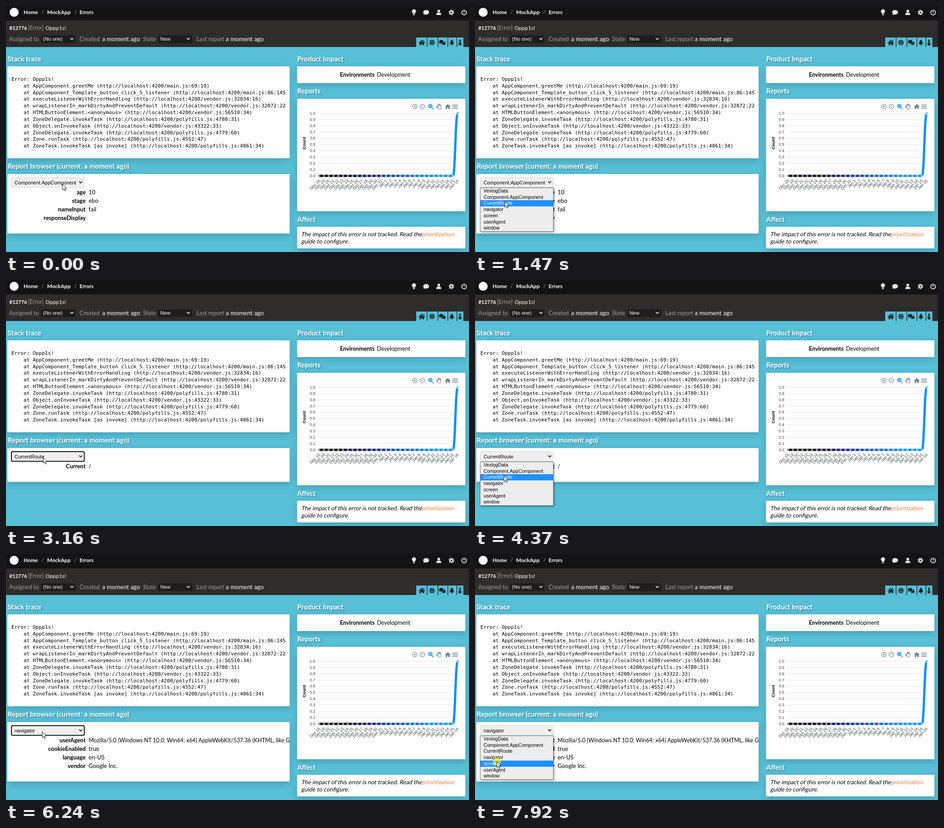
Recreate the animation shown at these times as an HTML page. Size 1026 by 546 pixels, loop 8 s.

```html
<!DOCTYPE html>
<html lang="en">
<head>
<meta charset="utf-8">
<title>Error report</title>
<style>
html, body { margin: 0; width: 100%; height: 100%; overflow: hidden; background: #57bfd6; }
svg { display: block; width: 1026px; height: 546px; }
text { font: 13px Lato, sans-serif; white-space: pre; }
.b { font-weight: 700; }
.ui { font-family: "Liberation Sans", Arial, sans-serif; }
.code { font-family: "DejaVu Sans Mono", monospace; }
.title { font-weight: 700; fill: #fff; filter: drop-shadow(2px 2px 1px rgba(0, 0, 0, .3)); }
.panel { fill: #fff; filter: drop-shadow(0 5px 7px rgba(0, 0, 0, .17)); }
.line { fill: none; stroke-linecap: round; stroke-linejoin: round; }
</style>
</head>
<body>
<svg id="stage" viewBox="0 0 1026 546">
  <defs>
    <linearGradient id="blue" gradientUnits="userSpaceOnUse" x1="694" x2="1001" y1="0" y2="0">
      <stop offset="0" stop-color="#000"/><stop offset=".22" stop-color="#000018"/>
      <stop offset=".4" stop-color="#0a1a70"/><stop offset=".6" stop-color="#0a55a8"/>
      <stop offset=".85" stop-color="#008ffb"/>
    </linearGradient>
  </defs>
  <rect width="1026" height="546" fill="#57bfd6"/>
  <rect width="1026" height="91" fill="#2f2c2c"/>
  <rect width="1026" height="32" fill="#131313"/>
  <circle cx="18" cy="14" r="10" fill="#fff"/>

  <g fill="#e8e8e8">
    <path d="M902 17.2c0-2-2.7-2.800-2.700-5.200a4.700 4.700 0 0 1 9.400 0c0 2.400-2.700 3.200-2.700 5.200zM902 18h4v1.500l-1 1h-2l-1-1z"/>
    <path d="M931 9c3.600 0 6.500 2.200 6.500 5s-2.900 5-6.500 5c-1 0-2-.2-2.800-.5-1 .8-2.200 1.200-3.500 1.200.8-.8 1.200-1.600 1.300-2.600-1-.8-1.500-1.900-1.500-3.100 0-2.800 2.900-5 6.500-5z"/>
    <circle cx="959" cy="11.300" r="3"/>
    <path d="M953.700 20v-1.500c0-2.300 1.500-3.800 3.500-3.800h3.600c2 0 3.500 1.500 3.500 3.800v1.500z"/>
    <g class="line" stroke="#e8e8e8">
      <circle cx="987" cy="14.300" r="3.200" stroke-width="2.600"/>
      <circle cx="987" cy="14.300" r="5.200" stroke-width="2" stroke-dasharray="2.300 3.145" stroke-linecap="butt"/>
      <path d="M1012.500 10a5.200 5.200 0 1 0 5.400 0M1015.200 8.500v5.500" stroke-width="1.800"/>
    </g>
  </g>

  <path fill="#57bfd6" d="M909 70h23.500v21h-23.500zM934 70h22.500v21h-22.500zM958 70h20.500v21h-20.500zM980 70h18.500v21h-18.500zM1000 70h13.500v21h-13.500z"/>
  <g fill="#10161a">
    <path d="M914 81.500l7.500-6.500 7.500 6.500-.9 1-6.600-5.700-6.600 5.700zM916.500 82.200l5-4.200 5 4.200v4.800h-3.700v-3.500h-2.600v3.500h-3.700zM925 75.500h1.700v3l-1.700-1.500z"/>
    <circle cx="944" cy="81" r="6"/>
    <path class="line" stroke="#57bfd6" stroke-width=".9" d="M938 79h12M938 83h12M944 75c-3.400 3.500-3.400 8.500 0 12 3.400-3.500 3.400-8.500 0-12z"/>
    <path d="M964.500 75.500c2.800 0 5 1.600 5 3.700s-2.200 3.700-5 3.700l-1.800-.3-3 1.200 1-2.200c-.8-.7-1.200-1.500-1.200-2.400 0-2.100 2.200-3.700 5-3.700zM970.500 79c2 .4 3.500 1.700 3.500 3.400 0 .9-.4 1.700-1.200 2.400l1 2.200-3-1.200c-2.700.6-5-.2-6.200-1.900 3.600.1 6.300-2 5.900-4.900z"/>
    <path d="M988 74.500l3.200 3.500h-1.300l2.500 3h-1.500l2.700 3.800h-4.700v2.700h-1.800v-2.700h-4.700l2.700-3.800h-1.500l2.500-3h-1.300z"/>
    <path d="M1004 76.500a2 2 0 0 1 4 0v5.300a3.200 3.200 0 1 1-4 0z"/>
    <path class="line" stroke="#57bfd6" d="M1006 77v7"/>
  </g>
  <rect x="77" y="65" width="77" height="17" rx="2" fill="#1e1c1c"/>
  <rect x="337" y="65" width="76" height="17" rx="2" fill="#1e1c1c"/>
  <path class="line" stroke="#fff" stroke-width="1.600" d="M143 71.500l3 3 3-3M401 71.500l3 3 3-3"/>

  <g class="panel">
    <rect x="3" y="134" width="625.500" height="204" rx="1.500"/>
    <rect id="report" x="3" y="373" width="625.500" rx="1.500"/>
    <rect x="645" y="134" width="373" height="37" rx="1.500"/>
    <rect x="645" y="206" width="373" height="249.500" rx="1.500"/>
    <rect x="645" y="490" width="373" height="48" rx="1.500"/>
  </g>

  <g class="line" stroke="#6e8192" stroke-width="1.100">
    <circle cx="906" cy="223.300" r="5.200"/><path d="M903.300 223.300h5.400M906 220.600v5.400"/>
    <circle cx="922.700" cy="223.300" r="5.200"/><path d="M920 223.300h5.400"/>
    <g stroke="#008ffb" stroke-width="1.700"><circle cx="940.300" cy="222" r="3.700"/><path d="M943.200 225l4 4M938.700 222h3.200M940.300 220.400v3.200" stroke-width="1.500"/></g>
    <path d="M956.500 225v-5.500q1-1.200 1.700 0v3-4.500q1-1.200 1.900 0v4-3.500q1-1.200 1.900 0v4-2.500q1-1.200 1.900 0v5.500q0 3.500-3.500 3.500-2.300 0-3.500-1.800l-3-3.600q.6-1.500 2.600 1.400z"/>
    <path d="M989.500 219.700h11.500M989.500 223.400h11.500M989.500 227.100h11.500" stroke-width="1.500"/>
  </g>
  <path fill="#6e8192" d="M972.500 223.700l6.500-6 6.500 6h-2v5h-3.300v-3.600h-2.400v3.600h-3.300v-5z"/>

  <g id="fixed"></g>
  <g id="rows"></g>
  <g id="select"></g>
  <g id="menu"></g>
  <g id="cursor">
    <circle id="click" cx=".5" cy=".8" r="9" fill="#ff0" opacity=".6"/>
    <path d="M.4 .5V13.600L3.400 10.800 5.300 15.500 7.300 14.600 5.400 10H9.300Z" fill="#fff" stroke="#000" stroke-width=".9"/>
  </g>
</svg>
<script>
const el = id => document.getElementById(id);
const text = (x, y, s, size = 13, cls = "", attrs = "") =>
  `<text x="${x}" y="${y}" class="${cls}" style="font-size:${size}px" ${attrs}>${s.replace(/</g, "&lt;")}</text>`;
const white = 'fill="#fff"', grey = 'fill="#a09d9d"', end = 'text-anchor="end"';

function header() {
  return text(39, 18.3, "Home", 11.8, "b", white) + text(78.5, 18.3, "/", 12, "", grey) +
    text(91, 18.3, "MockApp", 12, "b", white) + text(151.5, 18.3, "/", 12, "", grey) +
    text(163, 18.3, "Errors", 11.5, "b", white) +
    text(7.5, 52.5, "#12776", 11.2, "b", white) + text(48.5, 52.5, "[Error]", 12.5, "", grey) +
    text(87.5, 52.5, "Oppp1s!", 12.1, "", white) +
    text(7, 77.5, "Assigned to", 12.9, "", grey) + text(82, 77, "(No one)", 11.2, "ui", white) +
    text(163, 77.5, "Created", 12.9, "", grey) + text(213, 77.5, "a moment ago", 13.5, "", white) +
    text(303.5, 77.5, "State", 12.9, "", grey) + text(342, 77, "New", 11.2, "ui", white) +
    text(422, 77.5, "Last report", 12.9, "", grey) + text(487, 77.5, "a moment ago", 13.5, "", white);
}

function panels() {
  const site = "http://localhost:4200/";
  const calls = [
    ["AppComponent.greetMe", "main.js:69:19)"],
    ["AppComponent_Template_button_click_5_listener", "main.js:86:145"],
    ["executeListenerWithErrorHandling", "vendor.js:32834:16)"],
    ["wrapListenerIn_markDirtyAndPreventDefault", "vendor.js:32872:22"],
    ["HTMLButtonElement.<anonymous>", "vendor.js:56510:34)"],
    ["ZoneDelegate.invokeTask", "polyfills.js:4780:31)"],
    ["Object.onInvokeTask", "vendor.js:43322:33)"],
    ["ZoneDelegate.invokeTask", "polyfills.js:4779:60)"],
    ["Zone.runTask", "polyfills.js:4552:47)"],
    ["ZoneTask.invokeTask [as invoke]", "polyfills.js:4861:34)"]
  ];
  const italic = (x, y, s, size, color) =>
    `<g transform="translate(${x} ${y}) skewX(-12)" fill="${color}">${text(0, 0, s, size)}</g>`;
  return text(3.5, 123, "Stack trace", 15.2, "title") +
    text(3.5, 361, "Report browser (current: a moment ago)", 15.25, "title") +
    text(645.5, 123, "Product Impact", 15, "title") +
    text(645.5, 194, "Reports", 14.8, "title") + text(645.5, 479, "Affect", 14.8, "title") +
    text(12, 166, "Error: Oppp1s!", 11.23, "code") +
    calls.map(([fn, at], i) =>
      text(39, 180.8 + i * 14.83, `at ${fn} (${site}${at}`, 11.23, "code")).join("") +
    text(740, 157.3, "Environments", 12.5, "b") + text(822, 157.3, "Development", 12.5) +
    italic(654, 511, "The impact of this error is not tracked. Read the", 12.86, "#000") +
    italic(921.5, 511, "prioritization", 12.6, "#f0803c") +
    italic(654, 526.5, "guide to configure.", 13, "#000");
}

function chart() {
  const base = 377, top = 238.3, px = i => 694 + i * 307 / 29;
  let out = "", dots = "";
  for (let i = 0; i <= 10; i++) {
    const y = base - (base - top) * i / 10;
    out += `<path d="M693 ${y}H1003" stroke="#e0e0e0" stroke-width=".9"/>` +
      text(685.5, y + 2.6, (i / 10).toFixed(1), 8.8, "ui", end + ' fill="#373d3f"');
  }
  for (let i = 0; i < 30; i++) {
    const day = i < 14 ? "Dec " + (18 + i) : "Jan " + (i - 13), y = i < 29 ? base : top + 1;
    out += text(0, 0, day, 8.8, "ui", `${end} fill="#373d3f" transform="translate(${px(i) + 2.5} 388.500) rotate(-45)"`);
    dots += `<circle cx="${px(i)}" cy="${y}" r="1.700" fill="url(#blue)" stroke="#fff" stroke-width="1.100"/>`;
  }
  const mid = (px(28) + px(29)) / 2;
  return out + text(0, 0, "Count", 9.6, "ui b", 'text-anchor="middle" transform="translate(664 304.500) rotate(-90)"') +
    `<path class="line" stroke="url(#blue)" stroke-width="5" d="M694 ${base}H${px(28)}C${mid} ${base} ${mid} ${top} 1001 ${top}"/>` + dots;
}

const options = ["VexlogData", "Component.AppComponent", "CurrentRoute", "navigator", "screen", "userAgent", "window"];
const details = {
  1: [["age", "10"], ["stage", "ebo"], ["nameInput", "fail"], ["responseDisplay", ""]],
  2: [["Current", "/"]],
  3: [["userAgent", "Mozilla/5.0 (Windows NT 10.0; Win64; x64) AppleWebKit/537.36 (KHTML, like G"],
    ["cookieEnabled", "true"], ["language", "en-US"], ["vendor", "Google Inc."]]
};
// Cursor moves: start, end, number of steps, target x, target y
const moves = [
  [390, 580, 4, 113, 395], [1270, 1470, 4, 66, 433], [2600, 3160, 9, 82, 393],
  [3760, 3830, 2, 81, 394], [4230, 4370, 3, 64, 434], [4440, 4720, 5, 60, 452],
  [5480, 6240, 11, 80, 394], [6770, 6970, 4, 62, 437], [7040, 7320, 5, 49, 461],
  [7390, 7391, 1, 48, 460]
];
const opened = [[800, 2200], [3230, 5060], [6570, 8000]];
const clicks = [[800, 870], [2070, 2200], [3230, 3360], [4920, 5060], [6570, 6700], [7920, 8000]];
const within = (spans, t) => spans.some(([a, b]) => t >= a && t < b);
const menuTop = 403.5, rowHeight = 13.75;

function pointer(t) {
  let x = 125, y = 395;
  for (const [from, to, n, tx, ty] of moves) {
    if (t < from) break;
    const k = Math.min(n, Math.floor((t - from) / (to - from) * (n - 1) + 1e-6) + 1) / n;
    x += (tx - x) * k;
    y += (ty - y) * k;
  }
  return [x, y];
}

function drawSelect(value, focused) {
  const box = focused
    ? '<rect x="12" y="381" width="161.500" height="21.500" rx="3" fill="#efefef" stroke="#101010" stroke-width="2"/>'
    : '<rect x="11.500" y="380.500" width="162" height="22" rx="3" fill="#efefef" stroke="#d5d5d5"/>';
  return box + text(19, 395.5, options[value], 11, "ui") +
    '<path class="line" stroke="#111" stroke-width="1.700" d="M162.500 390l3 3 3-3"/>';
}

function drawMenu(active) {
  return `<rect x="11.500" y="403.500" width="162" height="97" fill="#ededed" stroke="#707070"
      style="filter:drop-shadow(2px 2px 2px rgba(0,0,0,.35))"/>
    <rect x="12" y="${menuTop + active * rowHeight}" width="161" height="${rowHeight}" fill="#1e90ff"/>` +
    options.map((s, i) => text(19, 414 + i * 13.7, s, 10.67, "ui", i === active ? white : "")).join("");
}

el("fixed").innerHTML = header() + panels() + chart();
let shown = "";

function frame(now) {
  const t = now % 8000, [x, y] = pointer(t);
  const value = t < 2200 ? 1 : t < 5060 ? 2 : 3;
  const open = within(opened, t);
  const active = y >= menuTop ? Math.floor((y - menuTop) / rowHeight) : value;
  el("cursor").setAttribute("transform", `translate(${x} ${y})`);
  el("click").style.display = within(clicks, t) ? "" : "none";
  const state = [value, open, active, t >= 2200].join();
  if (state !== shown) {
    shown = state;
    el("report").setAttribute("height", value === 2 ? 75 : 132);
    el("rows").innerHTML = details[value].map(([name, s], i) =>
      text(176.5, 418 + i * 19, name, 12.8, "b", end) +
      text(183, 418 + i * 19, s, s.length > 20 ? 12.4 : 13)).join("");
    el("select").innerHTML = drawSelect(value, !open && t >= 2200);
    el("menu").innerHTML = open ? drawMenu(active) : "";
  }
  requestAnimationFrame(frame);
}
frame(performance.now());
</script>
</body>
</html>
```
